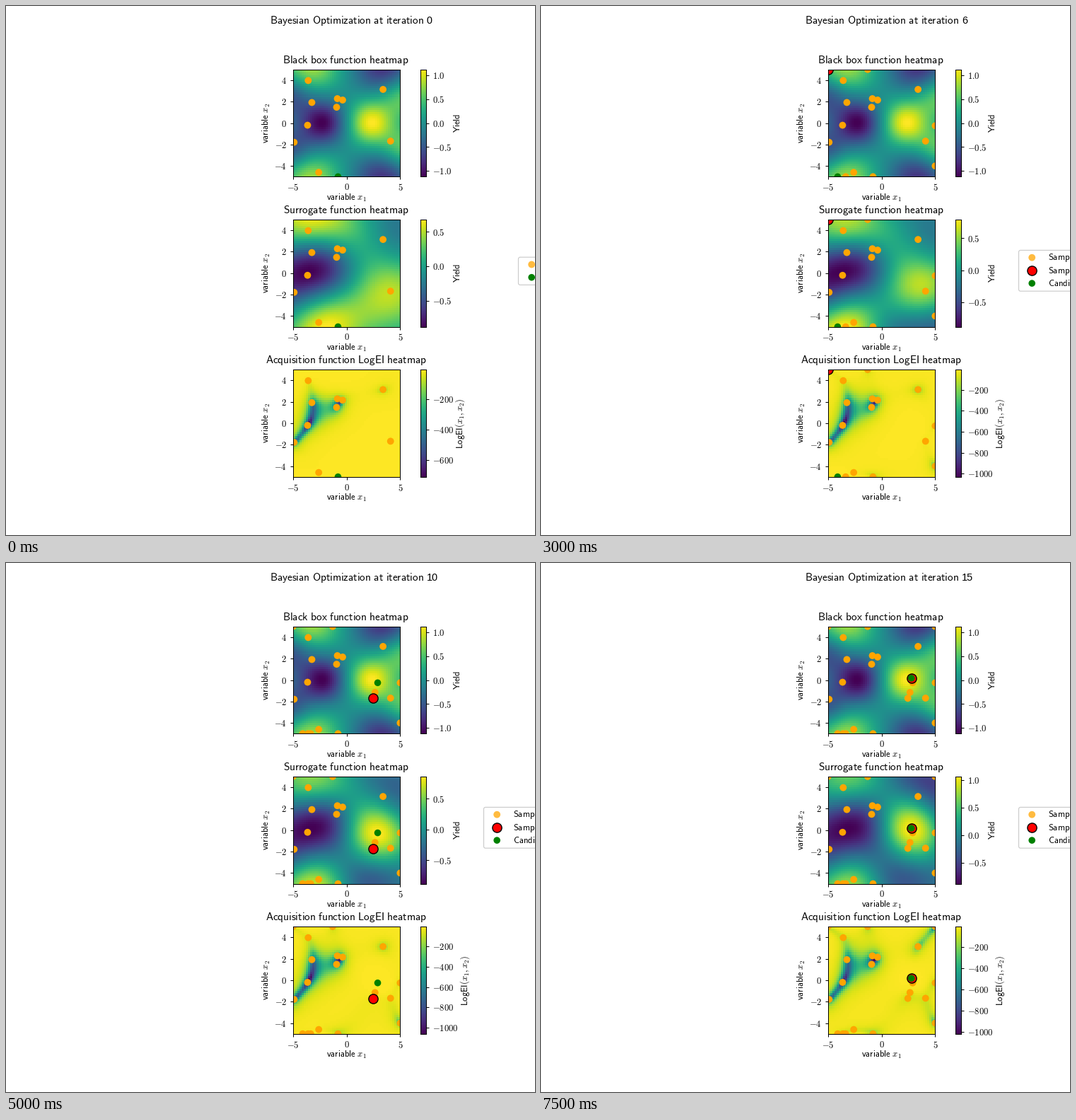
Recreate the animation shown at these times as a matplotlib script. Size 748 by 748 pixels, loop 8 s.

```python
import numpy as np
import matplotlib.pyplot as plt
from matplotlib.animation import FuncAnimation
from matplotlib.patches import FancyBboxPatch
from matplotlib.ticker import FuncFormatter

SIZE = 748
PT = 0.72  # points per pixel at 100 dpi
SMALL, BIG = 12.6 * PT, 15.2 * PT
SIDE = 0.77 * SIZE / 3.8
LEFT = 405.8
TOPS = [0.12 * SIZE + 1.4 * SIDE * i for i in range(3)]
N = 50

plt.rcParams.update({"mathtext.fontset": "cm", "font.size": SMALL,
                     "axes.linewidth": PT})
for tick in ("xtick", "ytick"):
    plt.rcParams.update({f"{tick}.major.width": PT,
                         f"{tick}.major.size": 4.4 * PT,
                         f"{tick}.major.pad": 4.4 * PT})

START = [(-3.58, 3.97), (-3.24, 1.92), (-3.64, -0.2), (-4.9, -1.79),
         (-0.86, 2.28), (-0.37, 2.15), (-0.93, 1.48), (3.4, 3.14),
         (4.1, -1.68), (-2.6, -4.6)]
PEAK = (2.78, 0.18)
PICKS = [(-0.8, -5), (-1.3, 5), (-3.35, -5), (5, -4), (5, -0.25), (-5, 5),
         (-4.1, -5), (-3.6, -5), (2.65, -1.15), (2.45, -1.7), (2.9, -0.25),
         PEAK, PEAK, (5, 5), PEAK, PEAK]
POINTS = np.array(START + PICKS, float)
FIRST, STEPS = len(START), len(PICKS)


def mean_range(k):
    return -0.88, 0.68 + 0.018 * k if k <= 10 else 1.06


def ei_range(k):
    low = np.interp(k, [0, 4, 8, 13, 15], [-709, -1041, -1017, -1121, -1020])
    return low, -7


def bump(x, y, cx, cy, sx, sy):
    return np.exp(-((x - cx) / sx) ** 2 / 2 - ((y - cy) / sy) ** 2 / 2)


def half(x, y):
    total = 1.12 * bump(x, y, 2.3, 0, 1.45, 1.5)
    for s in (-1, 1):
        total = total + 0.62 * bump(x, y, 5.3, 2.45 * s, 1.45, 1.4)
        total = total - 0.85 * bump(x, y, 3.45, 5.4 * s, 1.9, 1.8)
    return total


def black_box(x, y):
    return half(x, y) - half(-x, y)


def kernel(a, b):
    d = (a[:, None] - b[None]) / (2.8, 2.6)
    return np.exp(-0.5 * (d ** 2).sum(-1))


def rescale(a, lo, hi):
    return lo + (a - a.min()) / (a.max() - a.min()) * (hi - lo)


def log_ei(mu, sd, best):
    z = (mu - best) / sd
    a = np.abs(z)
    tail = -z ** 2 / 2 - 0.919 - np.log(1 + 1.253 * a + a ** 2)
    tail = np.where(z > 0, np.log(np.maximum(z, 0) + np.exp(tail)), tail)
    return tail + np.log(sd)


axis = np.linspace(-5, 5, N)
GX, GY = np.meshgrid(axis, axis)
GRID = np.column_stack([GX.ravel(), GY.ravel()])


def model(k):
    """Gaussian process mean and LogEI after k picks."""
    pts = POINTS[:FIRST + k]
    y = black_box(*pts.T)
    y = (y - y.mean()) / y.std()
    inv = np.linalg.inv(kernel(pts, pts) + 0.005 * np.eye(len(pts)))
    ks = kernel(GRID, pts)
    mu = ks @ inv @ y
    var = 1 - ((ks @ inv) * ks).sum(1)
    return mu, log_ei(mu, np.sqrt(np.maximum(var, 1e-5)), y.max())


def sans(s):
    return r"$\mathsf{" + s.replace(" ", r"\ ") + "}$"


def decimals(fmt):
    return FuncFormatter(lambda v, _: f"${v:{fmt}}$")


fig = plt.figure(figsize=(SIZE / 100, SIZE / 100), dpi=100, facecolor="white")


def box(x, y, w, h):
    return fig.add_axes([x / SIZE, 1 - (y + h) / SIZE, w / SIZE, h / SIZE])


page = box(0, 0, SIZE, SIZE)
page.set(xlim=(0, SIZE), ylim=(SIZE, 0))
page.axis("off")


def label(x, y, s, size=SMALL, ha="center", rot=0, **kw):
    return page.text(x, y, s, size=size, ha=ha, va="baseline", rotation=rot,
                     rotation_mode="anchor", clip_on=True, **kw)


def dots(ax, xy, color, d, edge="none", **kw):
    return ax.scatter(*np.reshape(xy, (-1, 2)).T, s=(d * PT) ** 2, c=color,
                      edgecolors=edge, linewidths=1.4 * PT, **kw)


class Panel:
    def __init__(self, top, title, unit, fmt):
        mid, centre = top + SIDE / 2, LEFT + SIDE / 2
        self.ax = ax = box(LEFT, top, SIDE, SIDE)
        self.img = ax.imshow(np.zeros((N, N)), origin="lower", aspect="auto",
                             extent=(-5, 5, -5, 5), interpolation="nearest",
                             cmap="viridis", zorder=0)
        none = np.empty((0, 2))
        self.old = dots(ax, none, "orange", 9.8, zorder=1)
        self.red = dots(ax, none, "red", 13.2, "black", zorder=1.1)
        self.new = dots(ax, none, "green", 9.6, zorder=1.2)
        ax.set(xlim=(-5, 5), ylim=(-5, 5), xticks=[-5, 0, 5],
               yticks=range(-4, 5, 2))
        for a in (ax.xaxis, ax.yaxis):
            a.set_major_formatter(decimals(".0f"))

        self.bar = bar = box(586.4, top, SIDE / 20, SIDE)
        self.ramp = bar.imshow(np.linspace(0, 1, 256)[:, None], origin="lower",
                               aspect="auto", cmap="viridis",
                               extent=(0, 1, 0, 1))
        bar.set_xticks([])
        bar.yaxis.tick_right()
        bar.yaxis.set_major_formatter(decimals(fmt))

        label(centre - 1, top - 8.9, sans(title), BIG)
        label(centre, top + 184.8, r"$\mathsf{variable}\ x_1$")
        label(372, mid, r"$\mathsf{variable}\ x_2$", rot=90)
        self.unit = label(642.3, mid, unit, rot=90)

    def show(self, data, lo, hi):
        self.img.set_data(rescale(data, lo, hi).reshape(N, N))
        self.img.set_clim(lo, hi)
        self.ramp.set_extent((0, 1, lo, hi))
        self.bar.set_ylim(lo, hi)

    def mark(self, k):
        n = FIRST + k
        last = n - min(k, 1)
        self.old.set_offsets(POINTS[:last])
        self.red.set_offsets(POINTS[last:n])
        self.new.set_offsets(POINTS[n:n + 1])


def legend(x, y, rows):
    parts = [page.add_patch(FancyBboxPatch(
        (x, y), 200, 2 + 18.6 * len(rows),
        boxstyle="round,pad=0,rounding_size=2.5",
        fc="white", ec="0.8", lw=1.2 * PT))]
    for i, (name, color, d, edge, alpha) in enumerate(rows):
        cy = y + 10.3 + 18.2 * i
        parts.append(dots(page, (x + 18.7, cy), color, d, edge,
                          alpha=alpha, zorder=3))
        parts.append(label(x + 41.5, cy + 3.6, sans(name), ha="left"))
    return parts


SAMPLE = ("Sampled points", "orange", 9.8, "none", 0.75)
LATEST = ("Sampled candidate", "red", 13.2, "black", 1)
NEXT = ("Candidate", "green", 9.6, "none", 1)
short = legend(724.5, 355.2, [SAMPLE, NEXT])
full = legend(675.5, 345.4, [SAMPLE, LATEST, NEXT])

label(373, 25, sans("Bayesian Optimization at iteration"), BIG, "left")
count = label(595, 25, "", 0.95 * BIG, "left", family="Liberation Sans")
truth = Panel(TOPS[0], "Black box function heatmap", sans("Yield"), ".1f")
guess = Panel(TOPS[1], "Surrogate function heatmap", sans("Yield"), ".1f")
gain = Panel(TOPS[2], "Acquisition function LogEI heatmap",
             r"$\mathsf{LogEI}(x_1, x_2)$", ".0f")
truth.show(black_box(GX, GY), -1.127, 1.127)


def update(k):
    count.set_text(str(k))
    mean, ei = model(k)
    low, high = ei_range(k)
    guess.show(mean, *mean_range(k))
    gain.show(ei, low, high)
    gain.unit.set_x(652.3 if low <= -1000 else 646)
    for p in (truth, guess, gain):
        p.mark(k)
    for part in short:
        part.set_visible(k == 0)
    for part in full:
        part.set_visible(k > 0)
    return []


anim = FuncAnimation(fig, update, frames=STEPS, init_func=lambda: update(0),
                     interval=500, repeat=True, repeat_delay=0, blit=False)
plt.show()
```
